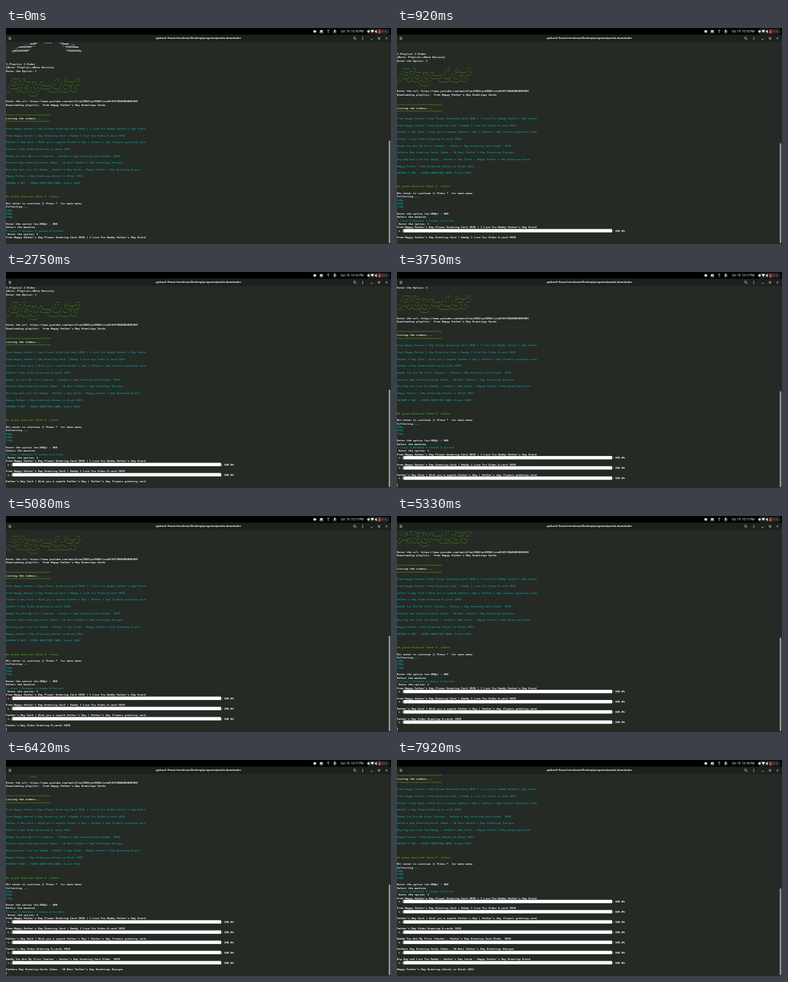
Animation, 600 px wide and 338 px high, one loop 8 s. Source, as an HTML page:

```html
<!DOCTYPE html>
<html lang="en">
<head>
<meta charset="utf-8">
<title>Terminal</title>
<style>
  html, body { margin: 0; width: 600px; height: 338px; overflow: hidden; background: #252a25; }
  #desk { position: absolute; width: 1920px; height: 1080px; transform: scale(.3125, .31296); transform-origin: 0 0;
    background: #252a25; color: #fff; }
  #desk > * { position: absolute; }
  #panel { left: 0; top: 0; width: 1920px; height: 34px; background: #000; }
  #head { left: 0; top: 34px; width: 1920px; height: 36px; background: #1c211d; }
  .label { white-space: pre; transform: translate(-50%, -50%); font-family: "Noto Sans", "Open Sans", sans-serif; line-height: 1; }
  #title { left: 960px; top: 51px; font-size: 13px; font-weight: 700; }
  #clock { left: 1726px; top: 17px; font-size: 14.5px; }
  #power { left: 1884px; top: 17px; font-size: 13px; color: #e08080; }
  #term { left: 0; top: 70px; width: 1900px; height: 986px; overflow: hidden;
    font: 13.29px/17px "DejaVu Sans Mono", monospace; -webkit-text-stroke: .4px; }
  .row { height: 17px; white-space: pre; position: relative; }
  .green { color: #4e9a06; }
  .teal { color: #06989a; }
  .fill { position: absolute; left: 32px; top: 0; width: 1040px; height: 17px; background: #fff; }
  #cursor { left: 0; top: 1058px; width: 2px; height: 16px; background: #eee; }
  #thumb { left: 1909px; width: 7px; border-radius: 4px; background: #a6aaa8; }
  svg { left: 0; top: 0; }
</style>
</head>
<body>
<div id="desk">
  <div id="panel"></div>
  <div id="head"></div>
  <svg width="1920" height="72" fill="none" stroke="#e8e8e8" stroke-width="2">
    <rect x="1800" y="3" width="114" height="28" rx="14" fill="#222" stroke="none"/>
    <g fill="#e8e8e8" stroke="none">
      <circle cx="1540" cy="17" r="7"/>
      <path d="M1565 11h15v9h-15zM1563 22h19v3h-19zM1827 24l-9-11q9-7 18 0z"/>
      <circle cx="1808" cy="17" r="6"/>
      <path d="M1840 14h4l5-5v17l-5-5h-4z"/>
      <path d="M1857 11h3v-3h5v3h3v16h-11z" fill="#d84040"/>
      <rect x="1636" y="8" width="7" height="12" rx="3.5"/>
      <circle cx="1779" cy="46" r="2"/><circle cx="1779" cy="52" r="2"/><circle cx="1779" cy="58" r="2"/>
    </g>
    <path d="M1607 9v17M1601 15l6-6 6 6M1632 16q0 8 7.500 8t7.500-8M1639 24v4"/>
    <path d="M13 47h13M13 52h13M13 57h13M1742 54l6 6M1818 57h11M1856 48h8v8h-8zM1893 47l9 9M1902 47l-9 9"/>
    <circle cx="1738" cy="50" r="5"/>
  </svg>
  <div id="title" class="label">python3 /home/nirudevan/Desktop/programs/panda-downloader</div>
  <div id="clock" class="label"></div>
  <div id="power" class="label">10 %</div>
  <div id="term"><div id="lines"></div></div>
  <div id="cursor"></div>
  <div id="thumb"></div>
</div>
<script>
const LOOP = 8000, ROW = 17, VIEW = 59;

// Alternately: a download completes, then the next title is printed.
const EVENTS = [420, 920, 1750, 1920, 3750, 4250, 5250, 5670, 6330, 6420, 6500, 6580, 7750, 7920];
const MINUTES = [3420, 7750];

const videos = [
  "Free Happy Father's Day Flower Greeting Card 2020 | I Love You Daddy Father's Day Ecard",
  "Free Happy Father's Day Greeting Card | Daddy I Love You Video E-card 2020",
  "Father's Day Card | Wish you a superb Father's Day | Father's day flowers greeting card.",
  "Father's Day Video Greeting E-cards 2020",
  "Daddy You Are My First Teacher - Father's Day Greeting Card Video  2020",
  "Fathers Day Greeting Cards Ideas - 10 Best Father's Day Greetings Designs",
  "Big Hug and Love You Daddy - Father's Day Cards - Happy Father's Day Greeting Ecard",
  "Happy Father's Day Greeting eCards in Hindi 2012",
  "FATHER'S DAY - VIDEO GREETING CARD, Ecard 2020"
];

const art = String.raw`           ....eeSP"    """""    "TSaaa..,_
      _.eeSSSSSP'"                 "'TSSSSSaa.
   .gdSSSSSSSP"                      "TSSSSSSSp.`;

const banner = String.raw`    ____  __                   __    _      __
   / __ \/ /___ ___  __       / /   (_)____/ /_
  / /_/ / / __ ${"`"}/ / / /_____/ /   / / ___/ __/
 / ____/ / /_/ / /_/ /_____/ /___/ (__  ) /_
/_/   /_/\__,_/\__, /     /_____/_/____/\__/
              /____/`;

const $ = id => document.getElementById(id);

function add(text, cls = "") {
  const row = document.createElement("div");
  row.className = "row " + cls;
  row.textContent = text;
  $("lines").append(row);
  return row;
}
const print = (text, cls) => text.split("\n").forEach(line => add(line, cls));

function addBar() {
  const row = add(" ↳ |" + " ".repeat(130) + "| 100.0%");
  const fill = document.createElement("span");
  fill.className = "fill";
  row.append(fill);
}

const rule = "*".repeat(28);
print(art);
print("\n\n\n1.Playlist 2.Video\n[Note: Playlist->Beta Version]\nEnter the Option: 1\n");
print(banner, "green");
print("\nEnter the url: https://www.youtube.com/watch?v=JJDGZrprEV0&list=PL6F23B45065BD5989");
print("Downloading playlist:  Free Happy Father's Day Greetings Cards\n\n");
print(rule, "green");
print("Listing the videos:...");
print(rule, "green");
print("\n" + videos.join("\n\n") + "\n\n\n", "teal");
print("We gonna download these 9  videos", "green");
print("\nHit enter to continue || Press *  for main menu\nCollecting ...");
print("144p\n360p\n720p", "teal");
print("\nEnter the option (ex:360p) : 360\nSelect the machine");
print("1.Linux 2.Windows 3.termux 4.Current", "teal");
print(" Enter the option: 1");
for (const title of videos) {
  add(title);
  addBar();
  add("");
}

const passed = (times, t) => times.filter(s => t >= s).length;

function draw(t) {
  const n = passed(EVENTS, t);
  const scroll = 3 * (n >> 1) + 2 * (n & 1);
  $("lines").style.transform = `translateY(${-scroll * ROW}px)`;

  const track = 1000, size = track * VIEW / (115 + scroll);
  $("thumb").style.top = 1076 - size + "px";
  $("thumb").style.height = size + "px";

  $("cursor").style.opacity = t >= 3750 && t < 7750 ? 1 : 0;
  $("clock").textContent = `Oct 19  10:${16 + passed(MINUTES, t)} PM`;
}

const start = performance.now();
function tick() {
  draw((performance.now() - start) % LOOP);
  requestAnimationFrame(tick);
}
draw(0);
requestAnimationFrame(tick);
</script>
</body>
</html>
```
